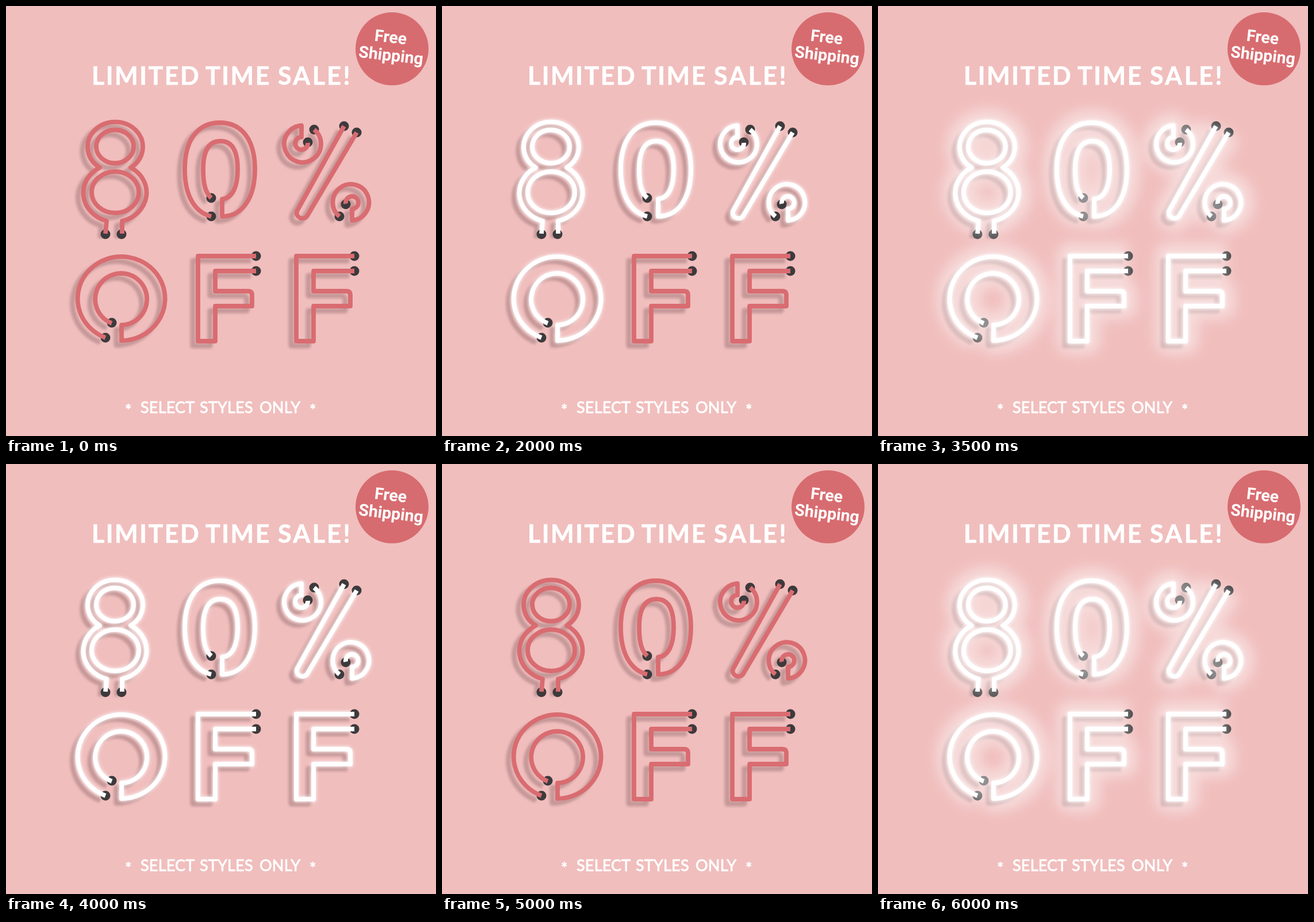
Recreate the animation shown at these times as an HTML page. Size 748 by 748 pixels, loop 7000 ms.

```html
<!DOCTYPE html>
<html lang="en">
<head>
<meta charset="utf-8">
<title>Limited Time Sale</title>
<style>
  html, body { margin: 0; width: 100%; height: 100%; overflow: hidden; background: #f0bebd; }
  svg { display: block; width: 100%; height: 100%; }
  text { fill: #fff; font-family: Lato, sans-serif; }
  path { fill: none; stroke-linejoin: round; }
  .title { font-size: 43px; font-weight: 700; letter-spacing: 2.5px; stroke: #fff; stroke-width: .7px; }
  .note { font-size: 27px; letter-spacing: .2px; stroke: #fff; stroke-width: .9px; }
  .badge text { font: 700 28.5px Roboto, sans-serif; text-anchor: middle; }
  .shadow { stroke: #8a6264; stroke-width: 9; opacity: .42; filter: blur(2px); }
  .glow { stroke: #fff; stroke-width: 11; opacity: .65; filter: blur(2.6px); }
  .halo { stroke: #fff; stroke-width: 46; opacity: .44; filter: blur(11px); }
  .tube { stroke-width: 7.8; }
  .hole { fill: #3d3a3c; }
</style>
</head>
<body>
<svg viewBox="0 0 748 748">
  <g id="sign"></g>
  <g class="title">
    <text x="149" y="137">LIMITED</text>
    <text x="347" y="137">TIME</text>
    <text x="473" y="137" style="letter-spacing:3.4px">SALE!</text>
  </g>
  <g class="note">
    <text x="207" y="713">*</text>
    <text x="234" y="707.5">SELECT</text>
    <text x="337" y="707.5">STYLES</text>
    <text x="441" y="707.5">ONLY</text>
    <text x="528" y="713">*</text>
  </g>
  <g class="badge">
    <circle cx="671.5" cy="74.5" r="63.5" fill="#d76c70"/>
    <g transform="rotate(6.5 670 75)">
      <text x="667" y="64">Free</text>
      <text x="671" y="95.5">Shipping</text>
    </g>
  </g>
</svg>
<script>
const sign = document.getElementById('sign');

const letterF = x => ({
  d: `M${x + 101} 435H${x}V583H${x + 30}V522H${x + 94}V503Q${x + 94} 496 ${x + 87} 496H${x + 30}V461H${x + 101}`,
  holes: [[x + 101, 435], [x + 101, 461]]
});

const letters = [
  { d: 'M173 396L175 374A57 51 0 0 1 163 281A48 43.5 0 1 1 217 281A57 51 0 0 1 202 374V396' +
       'M157 244.5a32.5 29 0 1 1 65 0a32.5 29 0 1 1 -65 0zM149 324a41 36 0 1 1 82 0a41 36 0 1 1 -82 0z',
    holes: [[173, 397], [201, 397]] },
  { d: 'M357 366C325 358 311 325 311 284C311 235 332 203 372 203C412 203 433 235 433 284' +
       'C433 333 412 366 376 366V336C394 334 403 315 403 284C403 253 394 235 373 235' +
       'C352 235 343 253 343 284C343 310 347 325 357 334',
    holes: [[357, 334], [357, 366]] },
  { d: 'M536 215A32 32 0 1 1 514 208V228A11 11 0 1 0 525 238' +
       'M588 209L506 357A10 10 0 0 0 524 365L610 220' +
       'M580 366A31.5 31.5 0 1 1 602 373V353A11 11 0 1 0 591 344',
    holes: [[536, 215], [525, 237], [588, 209], [610, 220], [580, 366], [591, 345]] },
  { d: 'M173 577A76 73 0 1 1 201 582V555A45 45 0 1 0 184 552',
    holes: [[173, 577], [184, 551]] },
  letterF(334),
  letterF(505)
];

function add(tag, attrs) {
  const el = document.createElementNS('http://www.w3.org/2000/svg', tag);
  for (const key in attrs) el.setAttribute(key, attrs[key]);
  return sign.appendChild(el);
}

const layer = (name, extra) => letters.map(({ d }) => add('path', { class: name, d, ...extra }));

layer('shadow', { transform: 'translate(-9 8)' });
const glows = layer('glow');
for (const { holes } of letters)
  for (const [cx, cy] of holes) add('circle', { class: 'hole', cx, cy, r: 8.5 });
const halos = layer('halo');
const tubes = layer('tube');

const STEP = 500, STEPS = 14, DARK = 10;
const BRIGHT = [7, 9, 12, 13];
const show = (el, on) => el.style.visibility = on ? 'visible' : 'hidden';

function draw(now) {
  const step = Math.floor(now / STEP) % STEPS;
  const bright = BRIGHT.includes(step);
  letters.forEach((_, i) => {
    const lit = step > i && step !== DARK;
    show(halos[i], bright);
    show(glows[i], lit);
    tubes[i].style.stroke = lit ? '#fff' : '#d96c71';
  });
}

const start = performance.now();
function tick() {
  draw(performance.now() - start);
  requestAnimationFrame(tick);
}
tick();
</script>
</body>
</html>
```
